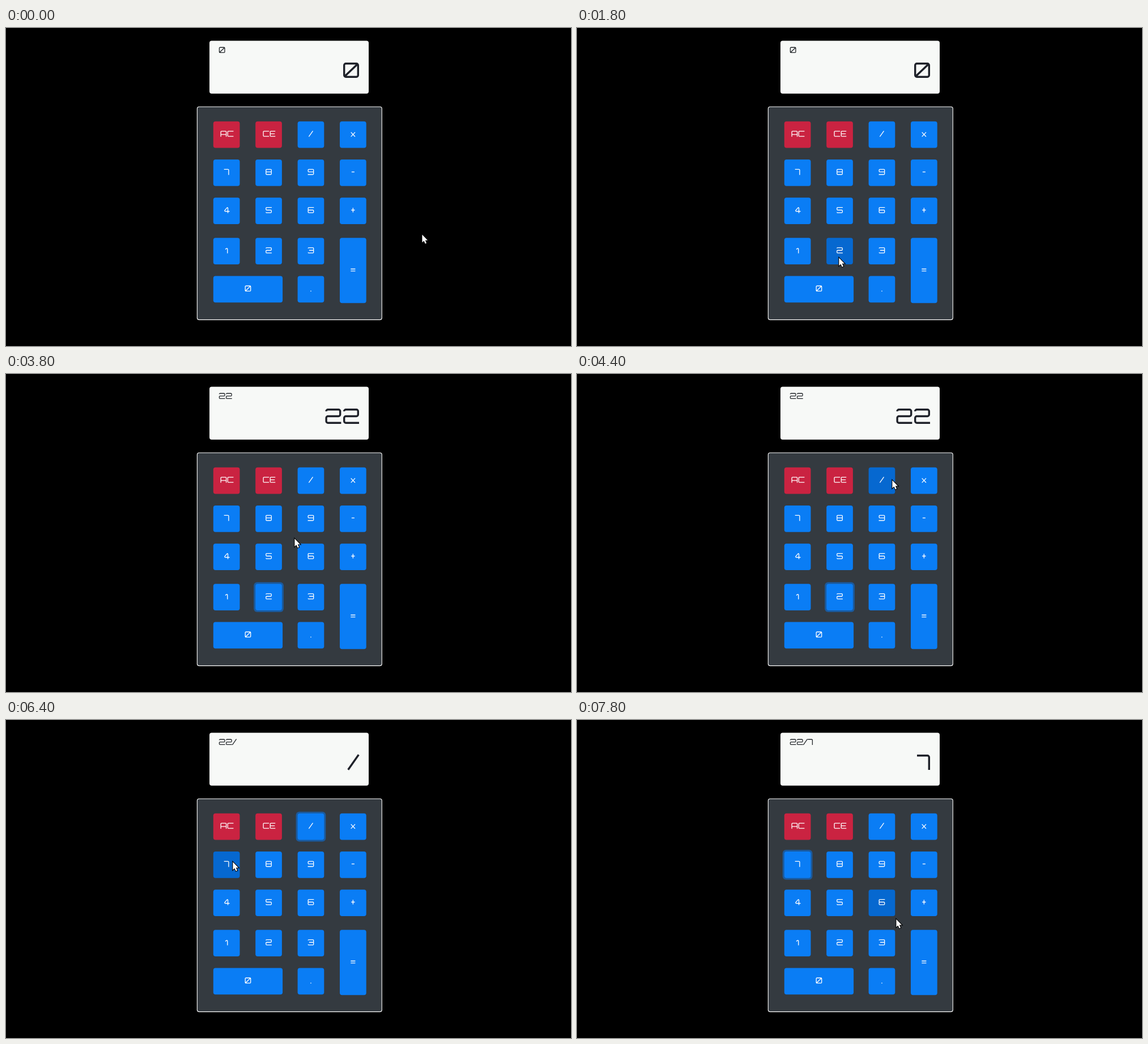
Animation of 997 by 561 pixels, one loop 8000 ms. Source, as an HTML page with a canvas:

```html
<!DOCTYPE html>
<html lang="en">
<head>
<meta charset="utf-8">
<title>Calculator</title>
<style>
  html, body { margin: 0; width: 100%; height: 100%; overflow: hidden; background: #000; }
  canvas { display: block; }
</style>
</head>
<body>
<canvas id="stage" width="997" height="561" role="img" aria-label="Calculator working out 22/7"></canvas>
<script>
const ctx = document.getElementById('stage').getContext('2d');
const LOOP = 8000, STEP = 200;

// Square lettering. Each stroke joins "column row" points of a 0-8 grid with rounded corners.
const CAP = 27, WEIGHT = 3.4, CORNER = 3, GAP = 3.6, SMALL = 0.385;
const strokes = {
  0: '40 80 88 08 00 40,17 71',
  1: '02 80 88',
  2: '01 00 80 84 04 08 88',
  3: '01 00 80 88 08 07,24 84',
  4: '68 60 50 06 86',
  5: '80 00 04 84 88 08 07',
  6: '80 00 08 88 84 04',
  7: '00 80 88',
  8: '40 80 88 08 00 40,04 84',
  9: '08 88 80 00 04 84',
  A: '08 00 80 88,05 85',
  C: '80 00 08 88',
  E: '80 00 08 88,04 74',
  x: '02 88,82 08',
  '/': '08 80',
  '-': '04 84',
  '+': '04 84,41 47',
  '=': '03 83,06 86',
  '.': '08 88'
};
const narrow = { 1: 12, 7: 23, E: 25, x: 20, '/': 20, '-': 13, '+': 16, '=': 21, '.': 4 };
const glyphWidth = ch => narrow[ch] || 28;

function glyphPath(ch) {
  const path = new Path2D();
  const onGrid = (size, n) => WEIGHT / 2 + (size - WEIGHT) * n / 8;
  for (const stroke of strokes[ch].split(',')) {
    const points = stroke.split(' ').map(([col, row]) => [onGrid(glyphWidth(ch), col), onGrid(CAP, row)]);
    path.moveTo(...points[0]);
    for (let i = 1; i < points.length - 1; i++) path.arcTo(...points[i], ...points[i + 1], CORNER);
    path.lineTo(...points[points.length - 1]);
  }
  return path;
}
const paths = Object.fromEntries(Object.keys(strokes).map(ch => [ch, glyphPath(ch)]));

// align: 0 left, 0.5 centre, 1 right
function drawText(text, x, y, scale, color, align) {
  let width = 0;
  const offsets = [...text].map((ch, i) => {
    if (i) width += ch === '/' || text[i - 1] === '/' ? 1 : GAP;
    const left = width;
    width += glyphWidth(ch);
    return left;
  });
  ctx.save();
  ctx.translate(x - width * scale * align, y);
  ctx.scale(scale, scale);
  ctx.strokeStyle = color;
  ctx.lineWidth = WEIGHT;
  ctx.lineCap = 'square';
  [...text].forEach((ch, i) => {
    ctx.save();
    ctx.translate(offsets[i], 0);
    ctx.stroke(paths[ch]);
    ctx.restore();
  });
  ctx.restore();
}

function box(x, y, w, h, r, fill) {
  ctx.fillStyle = fill;
  ctx.beginPath();
  ctx.roundRect(x, y, w, h, r);
  ctx.fill();
}

const KEY = 46.7;
const buttons = [];
function addButton(label, col, row, w = KEY, h = KEY) {
  const x = 365.8 + 74.4 * col;
  const y = 164.7 + 67.3 * row + (row > 2 ? 3.7 : 0);
  buttons.push({ label, x, y, w, h });
}
['AC CE / x', '7 8 9 -', '4 5 6 +', '1 2 3'].forEach((line, row) =>
  line.split(' ').forEach((label, col) => addButton(label, col, row)));
addButton('=', 3, 3, KEY, 115);
addButton('0', 0, 4, 122.3);
addButton('.', 2, 4);

// Each pointer move eases to x, y; sag bows its path downwards.
const home = [734, 364];
const moves = [
  { from: 0, to: 1200, x: 462, y: 405, sag: 45 },
  { from: 2000, to: 2400, x: 462, y: 393, sag: 0 },
  { from: 3200, to: 4400, x: 556, y: 187, sag: 0 },
  { from: 5200, to: 6400, x: 400, y: 250, sag: 0 },
  { from: 7000, to: 7800, x: 563, y: 351, sag: 0 }
];
function pointerAt(t) {
  let [x, y] = home;
  for (const move of moves) {
    const k = Math.min(1, Math.max(0, (t - move.from) / (move.to - move.from)));
    const eased = k * k * (3 - 2 * k);
    x += (move.x - x) * eased;
    y += (move.y - y) * eased + move.sag * Math.sin(Math.PI * eased);
  }
  return [x, y];
}

const presses = [[2400, '2'], [2800, '2'], [4800, '/'], [7000, '7']];
const typedBy = t => presses.filter(([time]) => time <= t).map(([, key]) => key).join('');

function drawButton({ label, x, y, w, h }, hovered, focused) {
  if (focused) box(x - 3, y - 3, w + 6, h + 6, 6, hovered ? '#195da6' : '#1b5a9d');
  const red = label.length > 1;
  box(x, y, w, h, 4, red ? '#ca2341' : hovered ? '#0668d0' : '#0a7df5');
  drawText(label, x + w / 2 + (red ? 0.8 : 0), y + h / 2 - 6.6, SMALL, '#fff', 0.5);
}

const arrow = new Path2D('M0 0V13.6L3.1 10.8 5.3 15.8 7.6 14.8 5.4 9.9H9.6z');
function drawPointer([x, y]) {
  ctx.save();
  ctx.translate(x + 0.4, y + 0.6);
  ctx.lineWidth = 2.2;
  ctx.strokeStyle = '#000';
  ctx.stroke(arrow);
  ctx.fillStyle = '#fff';
  ctx.fill(arrow);
  ctx.restore();
}

function render(t) {
  ctx.fillStyle = '#000';
  ctx.fillRect(0, 0, 997, 561);

  box(359, 22.5, 281, 93.3, 4, '#f7f9f7');
  const expression = typedBy(t) || '0';
  const [entry] = expression.match(/\d+$|\D$/);
  drawText(expression, 375.8, 33.6, SMALL, '#212529', 0);
  drawText(entry, 623, 61, 1, '#1e2129', 1);

  box(336.8, 138.4, 327, 376.8, 4, '#fff');
  box(337.9, 139.5, 324.8, 374.6, 3, '#343a40');

  // Hover trails the pointer; focus arrives just before the key is released
  const [hx, hy] = pointerAt(t - 150);
  const focus = typedBy(t + STEP).slice(-1);
  for (const b of buttons) {
    const hovered = hx >= b.x && hx <= b.x + b.w && hy >= b.y && hy <= b.y + b.h;
    drawButton(b, hovered, b.label === focus);
  }
  drawPointer(pointerAt(t));
}

const start = performance.now();
function tick(now) {
  const t = Math.max(0, now - start) % LOOP;
  render(Math.floor(t / STEP) * STEP);
  requestAnimationFrame(tick);
}
render(0);
requestAnimationFrame(tick);
</script>
</body>
</html>
```
